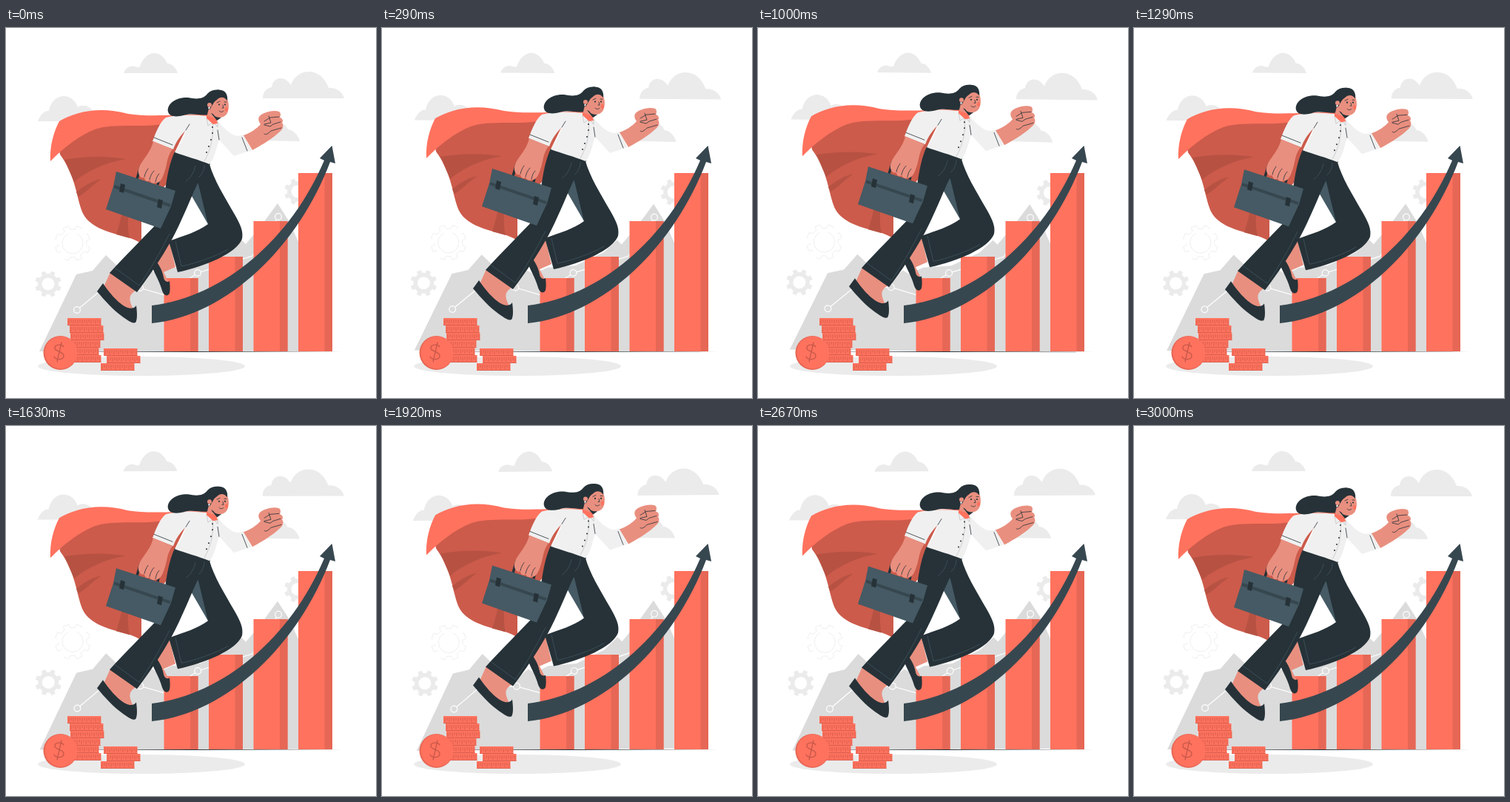
An HTML page for the animation above (3040 ms loop, 500x500 px).

```html
<!DOCTYPE html>
<html lang="en">
<head>
<meta charset="utf-8">
<title>Career growth</title>
<style>
  html, body { margin: 0; width: 100%; height: 100%; overflow: hidden; background: #fff; }
  svg { display: block; width: 100vw; height: 100vh; }
  .light { fill: #ebebeb; }
  .red { fill: #ff725e; }
  .redSide { fill: #e66755; }
  .cape { fill: #cc5b4b; }
  .fold { fill: #b75243; }
  .ink { fill: #263238; }
  .slate { fill: #37474f; }
  .skin { fill: #e98f7f; }
  .shirt { fill: #f0f0f0; }
  .line { fill: none; stroke: #263238; stroke-width: .8; stroke-linecap: round; stroke-linejoin: round; }
  .seam { fill: none; stroke: #455a64; stroke-width: .7; }
</style>
</head>
<body>
<svg viewBox="0 0 500 500">
  <g id="scenery">
    <g class="light">
      <path d="M159 61C161 54 168 50 174 52C178 53 179 54 181 52C184 42 192 34 200 34C209 34 215 41 218 48C224 48 230 54 232 61Z"/>
      <path d="M347 95C347 86 353 81 359 80C360 72 365 68 371 68C378 68 382 73 385 77C389 66 398 59 409 59C421 59 431 67 436 81C446 80 455 86 457 95Z"/>
      <path d="M43 126C46 118 52 111 58 112C60 101 67 93 77 92C87 92 94 98 97 107C103 102 114 106 118 112L118 126Z"/>
      <path d="M335 152C338 141 348 128 362 126C372 125 379 132 381 137C389 138 395 145 397 153Z"/>
      <path id="gearLeft" fill-rule="evenodd"/>
      <path id="gearRight" fill-rule="evenodd"/>
    </g>
    <path id="gearPale" fill="none" stroke="#ebebeb" stroke-width=".8" stroke-dasharray="60 12 20 8"/>
    <path fill="#dbdbdb" d="M45 437L95 333L117 328L135 307L152 323L176 345L197 328L205 333L224 324L262 321L300 303L318 286L324 292L345 267L367 237L383 262L400 300L432 437Z"/>
    <g fill="#dbdbdb" stroke="#fff" stroke-width="1.2">
      <path fill="none" d="M96 381L131 352L180 351L215 361L259 331L333 308L368 255"/>
      <circle cx="96" cy="381" r="4.4"/><circle cx="181" cy="351" r="4.4"/>
      <circle cx="259" cy="331" r="4.4"/><circle cx="368" cy="255" r="4.4"/>
    </g>
  </g>

  <ellipse class="light" cx="183" cy="457" rx="140" ry="13"/>
  <path class="ink" d="M45 437.500L250 437L455 437.500L250 438Z"/>
  <g id="bars"></g>
  <path class="slate" d="M197 375C295 363 385 285 430 179L424 176L440.500 159L445 183L438 181C396 293 300 389 197 399Z"/>
  <g id="coins"></g>
  <circle class="redSide" cx="73.500" cy="439" r="23"/>
  <circle class="red" cx="74.500" cy="438.500" r="22"/>
  <g fill="none" stroke="#c65849" stroke-width="1.300" stroke-linecap="round">
    <path d="M78 431C76 427 66 427 66 432C65 438 78 436 78 443C78 449 67 449 65 444M75 425L69 451"/>
  </g>

  <g id="woman">
    <!-- cape -->
    <path class="cape" d="M72 165L118 122L240 120L243 137L228 168L222 205L183 250L183 291C176 287 168 283 150 279C128 273 108 264 102 246C94 222 93 198 73 171Z"/>
    <path class="fold" d="M79 178C106 173 137 173 162 177C134 182 110 193 92 208Z"/>
    <path class="fold" d="M95 222C105 213 117 206 129 204C119 210 111 220 98 228Z"/>
    <path class="fold" d="M157 247C155 260 152 270 149 279L167 284C164 271 165 262 165 252Z"/>
    <path class="red" d="M60 180C59 160 64 141 72 126C92 114 125 105 165 116C195 121 240 116 273 117L285 128L243 125C222 128 204 132 187 132C160 132 137 131 120 137C98 146 80 160 60 180Z"/>

    <!-- rear leg and foot -->
    <path class="skin" d="M206 298L221 290L229 323L213 330L221 346L214 352L198 318Z"/>
    <path class="ink" d="M198 310C205 316 211 326 213 337C214 343 219 344 221 342C222 350 222 358 220 360C217 363 213 361 211 355C207 340 198 328 196 317Z"/>
    <path fill="#455a64" d="M248 222L260 200L280 264L273 265Z"/>
    <path class="ink" d="M255 180L275 184C281 205 294 226 309 252C317 266 321 275 319 285C312 304 270 322 232 330L220 288C240 281 260 275 273 265L259 207Z"/>
    <path class="seam" d="M229 288L237 322C257 318 285 308 300 299"/>

    <!-- front leg and foot -->
    <path class="skin" d="M141 330L175 355C166 361 165 366 172 380L160 386L131 352Z"/>
    <path class="ink" d="M131 345C137 354 150 371 162 377C168 380 174 379 176 375C177 383 178 394 175 398C170 400 163 394 156 389C146 382 134 369 123 356Z"/>
    <path class="ink" d="M228 167C247 171 263 176 276 183C272 196 264 203 258 212C247 236 237 262 224 286C210 311 193 336 177 357L140 331C160 309 185 284 207 261C216 234 214 198 228 167Z"/>
    <path class="seam" d="M147 324L180 348C203 315 216 287 221 278M256 186C254 195 250 202 243 207M268 185C268 193 264 199 260 202"/>

    <!-- shirt -->
    <path class="shirt" d="M272 119C256 117 229 117 216 121C208 127 203 140 198 153L226 164C230 153 236 145 243 138C239 151 234 160 228 168C242 173 260 178 275 184C283 174 284 162 288 151L308 173L332 165L321 144C309 150 299 140 286 126L280 129Z"/>
    <path class="line" d="M243 138L248 130M288 151L286 138M200 148L225 158M319 148L326 166"/>
    <path d="M279 129C281 147 277 164 268 180M271 121L273 132L280 127L286 134L286 126" fill="none" stroke="#bdbdbd" stroke-width=".7"/>
    <g id="buttons" class="ink"></g>

    <!-- raised fist -->
    <path class="skin" d="M321 145C330 142 339 136 344 130C339 123 341 118 349 115C356 112 364 111 369 113C372 115 371 119 370 121C374 122 375 126 373 128C376 132 374 137 370 140C362 148 348 157 333 165Z"/>
    <path class="line" d="M369 120L357 121L349 126M355 119L358 128L349 130M371 127L361 130L357 133L349 131M372 135L358 139C354 143 351 145 349 143"/>

    <!-- head -->
    <g transform="translate(0 1)">
      <path class="ink" d="M296 86C290 81 278 81 272 88C266 96 256 95 246 93C228 92 217 103 219 112C221 120 232 119 240 117C252 113 264 118 274 116L279 104Z"/>
      <path class="skin" d="M274 108L285 115L288 122L280 129L271 120Z"/>
      <path class="red" d="M271 117L284 122L286 128L280 129L271 121Z"/>
      <path class="ink" d="M277 114L291 120L285 124Z"/>
      <path class="skin" d="M276 98C280 90 292 89 299 95C302 102 301 109 299 114C295 121 287 121 282 118L276 110Z"/>
      <path class="ink" d="M273 104C270 90 281 80 291 83C298 84 300 92 299 97C295 92 290 91 285 96C280 99 279 104 276 108Z"/>
      <circle class="skin" cx="275" cy="103" r="3"/>
      <circle cx="274.500" cy="107" r="1.200" fill="#fff"/>
      <ellipse cx="298" cy="109" rx="2" ry="3" fill="#ff725e"/>
      <circle class="ink" cx="288" cy="102.500" r="1.100"/><circle class="ink" cx="296" cy="102.500" r="1.100"/>
      <path class="line" d="M285 100L289 98M295 99L298 99M293 103L294 107L292 107M288 111C290 113 292 113 294 111"/>
    </g>

    <!-- briefcase and gripping hand -->
    <path d="M177 204L182 187M205 212L208 196" fill="none" stroke="#263238" stroke-width="3.500"/>
    <path fill="#455a64" d="M149 194L229 220L223 241L209 271L135 245L145 214Z"/>
    <path d="M146 214L222 240" stroke="#37474f" stroke-width="4"/>
    <path class="ink" d="M155 210L161 212L159 223L153 221ZM206 231L212 233L210 244L204 242Z"/>
    <path class="skin" d="M199 153L225 164C217 174 218 185 214 195C211 205 206 211 202 209C199 211 195 209 194 206C190 209 187 205 187 202C182 204 178 198 179 192C181 180 195 171 199 153Z"/>
    <path class="line" d="M187 201C188 196 190 193 192 190M194 205C195 200 197 196 200 193M202 208C203 203 204 200 207 197"/>
  </g>
</svg>
<script>
const byId = id => document.getElementById(id);

function gear(cx, cy, inner, outer, hole, teeth = 8) {
  const at = (r, a) => `${(cx + r * Math.cos(a)).toFixed(2)} ${(cy + r * Math.sin(a)).toFixed(2)}`;
  const step = 2 * Math.PI / teeth;
  let d = "";
  for (let i = 0; i < teeth; i++) {
    const a = (i + .5) * step;
    d += [[inner, -.29], [outer, -.2], [outer, .2], [inner, .29]]
      .map(([r, k], j) => (i || j ? "L" : "M") + at(r, a + k * step)).join("");
  }
  const arc = `A${hole} ${hole} 0 1 0 `;
  return d + `ZM${cx - hole} ${cy}${arc}${cx + hole} ${cy}${arc}${cx - hole} ${cy}Z`;
}
byId("gearLeft").setAttribute("d", gear(57, 346, 14, 18, 8.5));
byId("gearRight").setAttribute("d", gear(394, 221, 14, 18, 8.5));
byId("gearPale").setAttribute("d", gear(90, 291, 19, 24, 14));

const rect = (cls, x, y, w, h) => `<rect class="${cls}" x="${x}" y="${y}" width="${w}" height="${h}"/>`;

byId("bars").innerHTML = [[213.5, 338], [274, 309], [334.5, 261], [395, 196]]
  .map(([x, y]) => rect("red", x, y, 46, 437 - y) + rect("redSide", x + 35.5, y, 10.5, 437 - y)).join("");

// Each coin: left edge, top
byId("coins").innerHTML = [
  [83, 442], [80, 432], [82, 422], [87, 412], [86, 402], [83, 392],
  [128, 453], [136, 443], [132, 433]
].map(([x, y]) => {
  let ticks = "";
  for (let i = 2; i < 45; i += 3) ticks += `M${x + i} ${y + 2}v${i % 2 ? 4 : 6}`;
  return rect("red", x, y, 45.5, 10) +
    `<path d="${ticks}M${x} ${y + 9.5}h45.5" stroke="#cc5b4b" stroke-width=".8"/>`;
}).join("");

byId("buttons").innerHTML = [[279, 134], [279, 142], [277, 151], [274, 160], [271, 168]]
  .map(([x, y]) => `<circle cx="${x}" cy="${y}" r="1"/>`).join("");

const LOOP = 3040, CYCLE = 3000, FPS = 24;
const triangle = p => 1 - Math.abs(1 - 2 * (p % 1));

function draw(now) {
  const t = Math.floor((now % LOOP + 4) * FPS / 1000) / FPS * 1000;
  const sway = 2 * triangle(t / CYCLE + .25) - 1;
  const lift = 10 * triangle(2 * t / CYCLE);
  byId("scenery").setAttribute("transform", `rotate(${sway} 250 250)`);
  byId("woman").setAttribute("transform", `translate(0 ${-lift})`);
}

const start = performance.now();
function tick() {
  draw(performance.now() - start);
  requestAnimationFrame(tick);
}
tick();
</script>
</body>
</html>
```
